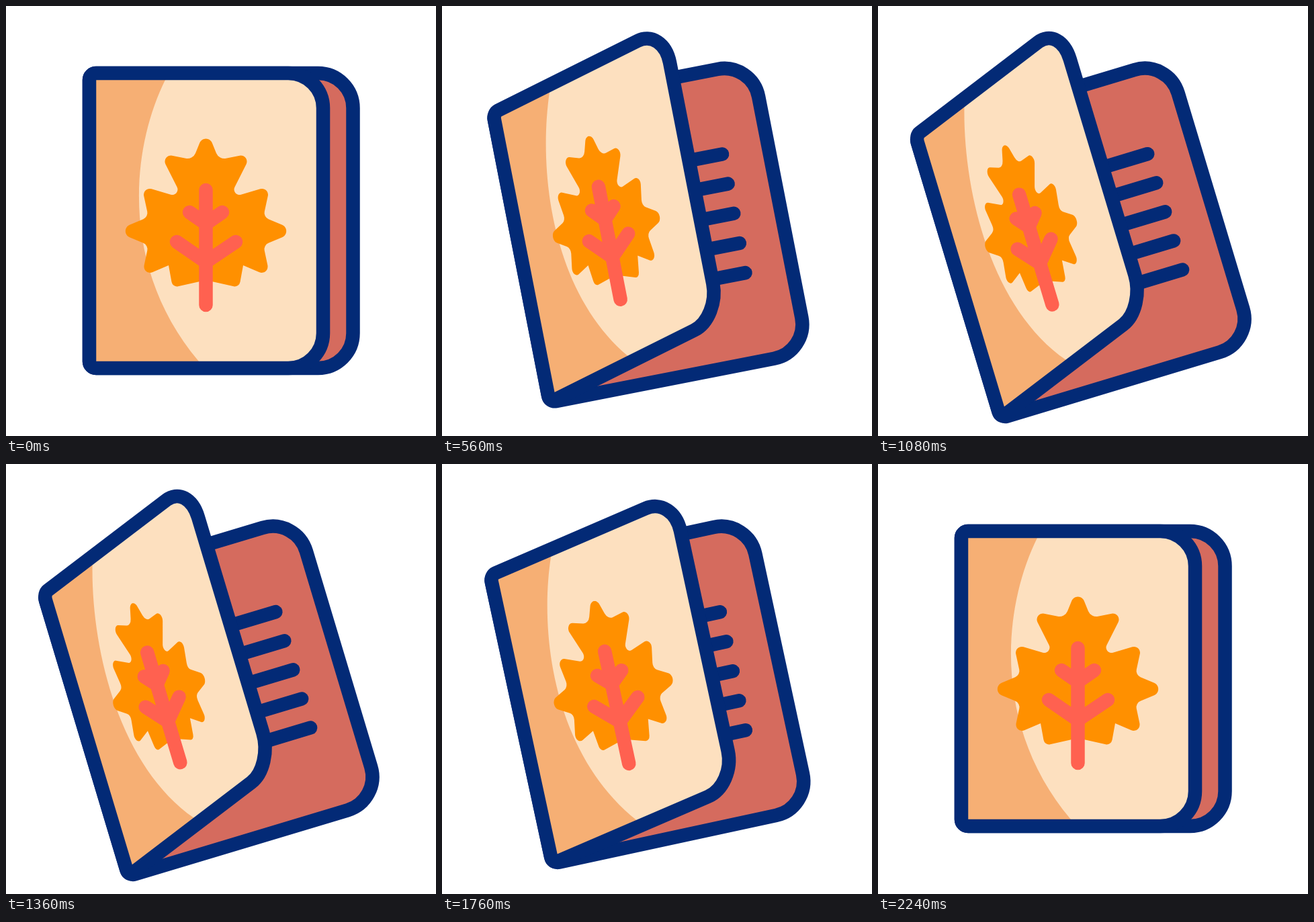
Animation, 640 px wide and 640 px high, one loop 2.44 s. Source, as an HTML page with a canvas:

```html
<!DOCTYPE html>
<html lang="en">
<head>
<meta charset="utf-8">
<title>Leaf notebook</title>
<style>
html, body { margin: 0; width: 100%; height: 100%; overflow: hidden; background: #fff; }
canvas { display: block; }
</style>
</head>
<body>
<canvas id="stage" width="640" height="640"></canvas>
<script>
const ctx = document.getElementById('stage').getContext('2d');
const NAVY = '#032a76', LOOP = 2440, STEP = 40;
const SPINE = 124, MID = 297.5, MAX_TURN = 16.9 * Math.PI / 180;

// Closed path through [x, y, corner radius] points.
function rounded(points) {
  const path = new Path2D();
  const [lastX, lastY] = points[points.length - 1];
  path.moveTo((lastX + points[0][0]) / 2, (lastY + points[0][1]) / 2);
  points.forEach(([x, y, r], i) => {
    const [nextX, nextY] = points[(i + 1) % points.length];
    path.arcTo(x, y, nextX, nextY, r);
  });
  path.closePath();
  return path;
}

const board = right => rounded([
  [SPINE, 100, 10], [right, 100, 52], [right, 539, 52], [SPINE, 539, 10]
]);

const halfLeaf = [
  [317, 229, 13], [366, 219, 9], [332, 286, 8], [393, 268, 9],
  [383, 314, 10], [433, 335, 10], [383, 356, 10], [393, 403, 9],
  [353, 386, 0], [347, 419, 8]
];
const leaf = rounded([
  [MID, 181, 10], ...halfLeaf, [MID, 408, 0],
  ...halfLeaf.map(([x, y, r]) => [2 * MID - x, y, r]).reverse()
]);

const back = board(516.5);
const cover = board(472);
const light = new Path2D('M237 110C185 215 170 390 287 529L300 560H500V80H252Z');
const veins = new Path2D('M297.5 274V445M273 307L297.5 324L322 307M254 351L297.5 381L342 351');
const lines = new Path2D();
for (let i = 0; i < 5; i++) {
  lines.moveTo(360, 225.5 + 45 * i);
  lines.lineTo(447, 225.5 + 45 * i);
}

// Eased progress from 0 to 1; x1 and x2 set the weight of each end.
function ease(t, start, length, x1, x2) {
  const u = Math.min(1, Math.max(0, (t - start) / length));
  let low = 0, high = 1;
  for (let i = 0; i < 30; i++) {
    const s = (low + high) / 2, r = 1 - s;
    if (3 * s * r * r * x1 + 3 * s * s * r * x2 + s * s * s < u) low = s;
    else high = s;
  }
  return low * low * (3 - 2 * low);
}

// Transforms the path but keeps the line width even.
function stroke(path, matrix, color) {
  const moved = new Path2D();
  moved.addPath(path, matrix);
  ctx.strokeStyle = color;
  ctx.stroke(moved);
}

function draw(t) {
  const turn = t < 1220 ? ease(t, 200, 1020, .34, .083) : 1 - ease(t, 1220, 1020, .82, .52);
  const open = t < 1220 ? ease(t, 200, 670, .33, .28) : 1 - ease(t, 1555, 475, .333, .667);
  const still = new DOMMatrix();

  ctx.setTransform(1, 0, 0, 1, 0, 0);
  ctx.fillStyle = '#fff';
  ctx.fillRect(0, 0, 640, 640);
  ctx.lineWidth = 20.5;
  ctx.lineCap = ctx.lineJoin = 'round';
  ctx.translate(406, 378);
  ctx.rotate(-MAX_TURN * turn);
  ctx.translate(-406, -378);

  ctx.fillStyle = '#d56b5e';
  ctx.fill(back);
  stroke(lines, still, NAVY);
  stroke(back, still, NAVY);

  // The cover narrows towards the spine while its free edge rises.
  const fold = .273 * open;
  const swing = new DOMMatrix([1 - fold, -fold, 0, 1, SPINE * fold, SPINE * fold]);
  ctx.save();
  ctx.transform(swing.a, swing.b, swing.c, swing.d, swing.e, swing.f);
  ctx.fillStyle = '#f6af74';
  ctx.fill(cover);
  ctx.clip(cover);
  ctx.fillStyle = '#fde0bf';
  ctx.fill(light);
  ctx.restore();
  stroke(cover, swing, NAVY);

  const squeeze = 1 - .408 * open;
  const shift = new DOMMatrix([squeeze, 0, 0, 1, MID * (1 - squeeze) - 51 * open, -45.7 * open]);
  const shape = new Path2D();
  shape.addPath(leaf, shift);
  ctx.fillStyle = '#ff9000';
  ctx.fill(shape);
  stroke(veins, shift, '#ff6150');
}

function tick() {
  draw(Math.floor(performance.now() % LOOP / STEP) * STEP);
  requestAnimationFrame(tick);
}
tick();
</script>
</body>
</html>
```
